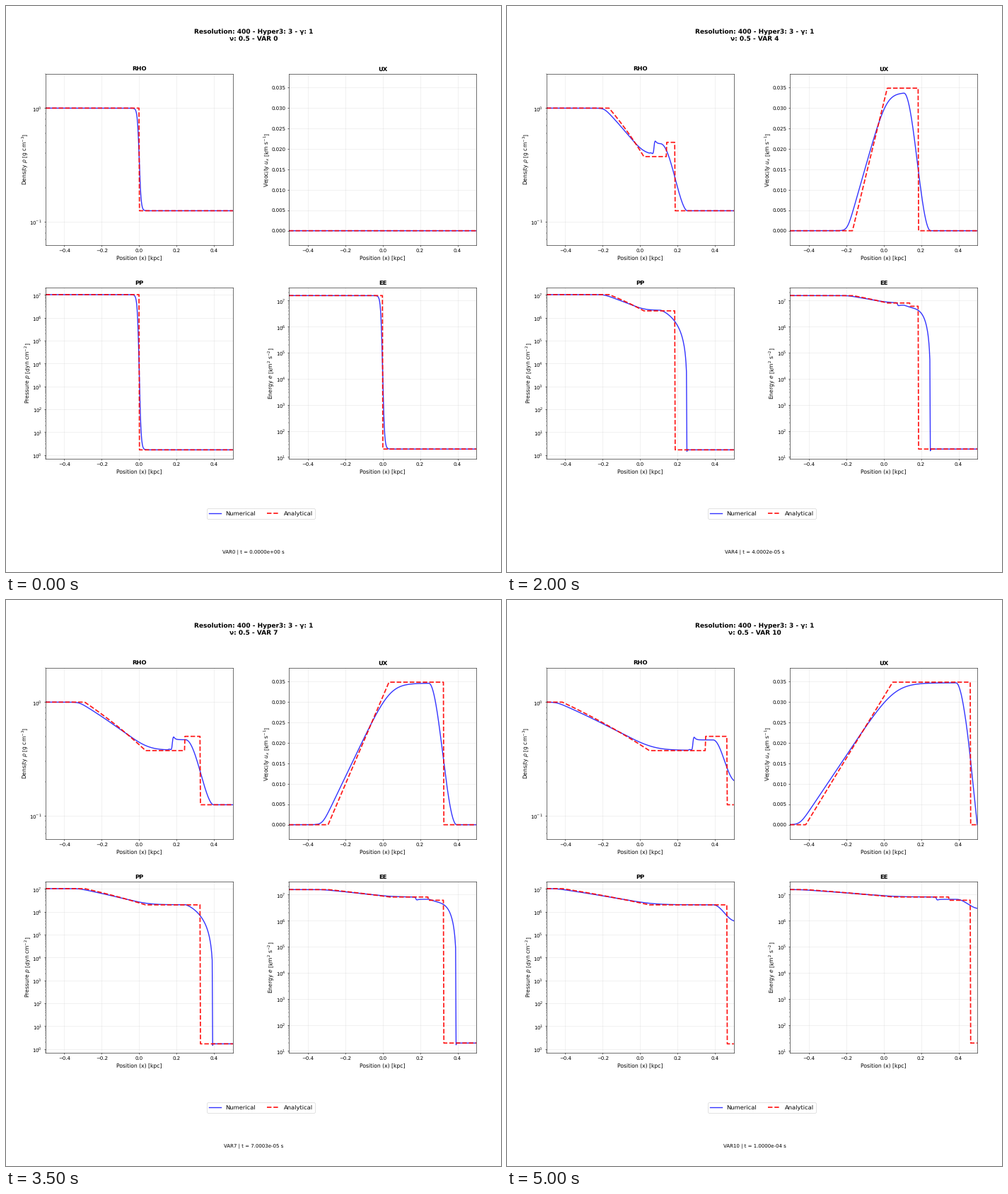
A matplotlib script for the animation above (5500 ms loop, 700 by 800 pixels).

```python
import numpy as np
import matplotlib.pyplot as plt
from matplotlib.animation import FuncAnimation

plt.rcParams["text.hinting"] = "no_hinting"

# Shock tube, gamma = 5/3; speeds in km/s, tau = t * 1e5
C_L, U_S = 0.0416, 0.03482
D_S = 4 / 3 * U_S
RHO_R, P_R = 0.125, 1.67
P_L = 0.6e10 * C_L ** 2
TIMES = [0, 1.0002, 2.0005, 3.0002, 4.0002, 5.0003,
         6.0003, 7.0003, 8.0004, 9.0004, 10.0]

x = np.linspace(-0.5, 0.5, 400)


def soft(z, d):
    return d * np.logaddexp(0, z / d)


def isentrope(u, power):
    return (1 - u / (3 * C_L)) ** power


def with_energy(rho, u, p):
    return rho, u, p, 1.5 * p / rho


def analytical(tau):
    tau = max(tau, 1e-9)
    u = np.clip(0.75 * (C_L + x / tau), 0, U_S)
    ahead = x > D_S * tau
    rho = np.where(x < U_S * tau, isentrope(u, 3), 4 * RHO_R)
    rho = np.where(ahead, RHO_R, rho)
    p = np.where(ahead, P_R, P_L * isentrope(u, 5))
    return with_energy(rho, np.where(ahead, 0, u), p)


def initial():
    s = 0.5 * (1 + np.tanh(x / 0.01))
    return with_energy(RHO_R ** s, 0 * x, P_L * (P_R / P_L) ** s)


def rarefaction(pos, tau):
    """Ramp from rest to the plateau with both corners rounded."""
    head = C_L * tau + 0.031 * (1 - np.exp(-tau / 2))
    ramp = (0.0305 + 0.014 / tau ** 2) * (1 + pos / head)
    peak = U_S * (0.996 - 0.45 * np.exp(-0.7 * tau))
    u = peak - soft(peak - ramp, 0.003 + 0.005 / tau)
    return soft(u, 0.0005 + 0.0045 / tau)


def numerical(tau):
    if tau == 0:
        return initial()
    top = D_S * tau - 0.078 * (1 - np.exp(-1.15 * tau))
    toe = D_S * tau + 0.052 + 0.0066 * np.log2(tau)
    contact = U_S * tau - 0.067 * (1 - np.exp(-tau))

    def fall(a, b):
        f = np.clip((x - a) / (b - a), 0, 1)
        return f, 0.5 * (1 + np.cos(np.pi * f))

    f, c = fall(top, toe)
    behind = rarefaction(np.minimum(x, top), tau)
    u = behind * c

    # density: rarefied gas, contact jump with overshoot, smeared shock
    left = isentrope(behind, 3)
    left *= 1 + 0.015 * np.exp(-((x - contact + 0.016) / 0.006) ** 2)
    level = 0.465 * (1 + 0.9 * np.exp(-0.75 * tau))
    past = np.maximum(x - contact - 0.007, 0)
    right = level * (1 + 0.065 * np.exp(-past / 0.008))
    p = P_L * isentrope(behind, 5)

    if toe > 0.5:
        # gas piles up at the wall
        c = fall(top + 0.003, 0.51)[1]
        right = right ** c * 10 ** (-0.695 * (1 - c))
        p = p ** c * 10 ** (5.595 * (1 - c))
        u = u - u[-1] * np.clip((x - 0.44) / 0.06, 0, 1) ** 2
    else:
        s = c ** 0.85
        right = right ** s * RHO_R ** (1 - s)
        p = p * (1 - f ** 1.25) ** 1.85
        cut = f > 0.975
        p = np.where(cut, P_R, p + P_R)
        p[np.argmax(cut)] *= 0.86

    s = 0.5 * (1 + np.tanh((x - contact) / 0.0035))
    rho = left ** (1 - s) * right ** s
    return with_energy(rho, u, p)


fig, axes = plt.subplots(2, 2, figsize=(14, 16), dpi=50)
fig.subplots_adjust(left=0.08, right=0.95, top=0.88, bottom=0.2,
                    wspace=0.3, hspace=0.25)

PANELS = [
    ("RHO", r"Density $\rho$ [g cm$^{-3}$]", (RHO_R / 2, 2)),
    ("UX", r"Velocity $u_x$ [km s$^{-1}$]", (-0.1 * U_S, 1.1 * U_S)),
    ("PP", r"Pressure $p$ [dyn cm$^{-2}$]", (0.678, 2 * P_L)),
    ("EE", r"Energy $e$ [km$^2$ s$^{-2}$]", (8.47, 3 * P_L)),
]

num_lines, ana_lines = [], []
for ax, (name, label, limits) in zip(axes.flat, PANELS):
    if name != "UX":
        ax.set_yscale("log")
    ax.set_xlim(-0.5, 0.5)
    ax.set_ylim(*limits)
    ax.set_title(name, fontsize=12, fontweight="bold")
    ax.set_xlabel("Position (x) [kpc]", fontsize=11)
    ax.set_ylabel(label, fontsize=11, labelpad=0.8)
    ax.grid(True, alpha=0.3)
    num_lines += ax.plot([], [], "b-", lw=2, alpha=0.8, snap=False,
                         label="Numerical")
    ana_lines += ax.plot([], [], "r--", lw=2.5, alpha=0.9, snap=False,
                         label="Analytical")

fig.legend(handles=[num_lines[0], ana_lines[0]], loc="center", ncol=2,
           fontsize=12, columnspacing=1.9, bbox_to_anchor=(0.515, 0.1031))
heading = fig.suptitle("", x=0.5, y=0.96, fontsize=13, fontweight="bold")
clock = fig.text(0.5, 0.03, "", ha="center", va="bottom", fontsize=10)


def update(n):
    tau = TIMES[n]
    for lines, state in ((num_lines, numerical(tau)),
                         (ana_lines, analytical(tau))):
        for line, values in zip(lines, state):
            line.set_data(x, values)
    heading.set_text("Resolution: 400 - Hyper3: 3 - γ: 1\n"
                     f"ν: 0.5 - VAR {n}")
    clock.set_text(f"VAR{n} | t = {tau * 1e-5:.4e} s")
    return num_lines + ana_lines + [heading, clock]


anim = FuncAnimation(fig, update, frames=len(TIMES), interval=500,
                     repeat=True, repeat_delay=0, blit=False)
plt.show()
```
